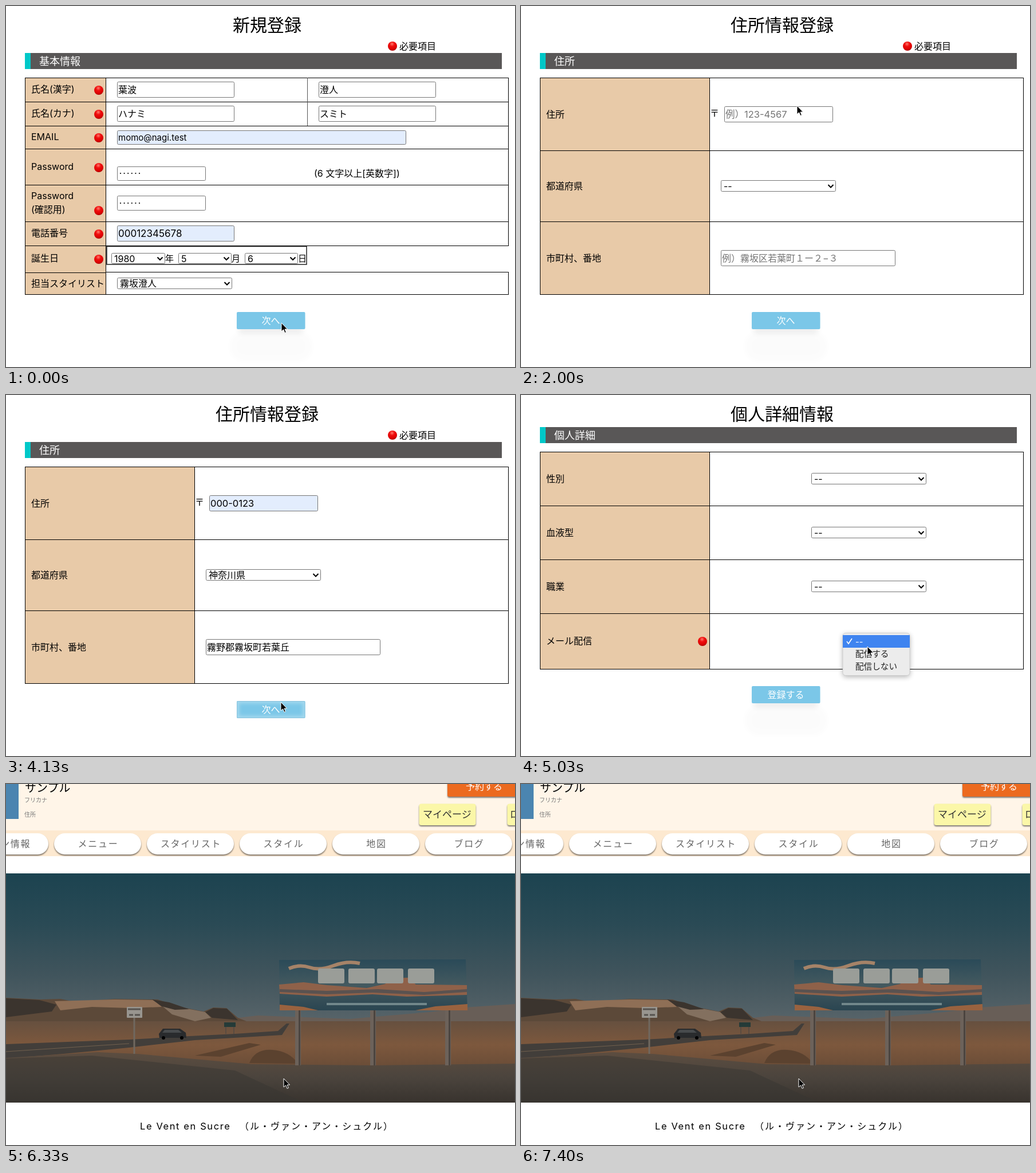
An HTML page that plays this animation: 889x630 px, repeating every 7430 ms.

```html
<!DOCTYPE html>
<html lang="ja">
<head>
<meta charset="utf-8">
<title>新規登録</title>
<style>
html, body { margin: 0; width: 100%; height: 100%; overflow: hidden; background: #fff; }
#stage { display: block; width: 889px; height: 630px; }
text { font-family: Inter, "Noto Sans CJK JP", "Noto Sans CJK", sans-serif; white-space: pre; }
</style>
</head>
<body>
<svg id="stage" viewBox="0 0 889 630" xmlns="http://www.w3.org/2000/svg"></svg>
<script>
const LOOP = 7430;
const TAN = '#e8caa8', AUTOFILL = '#e3edfd';

// --- drawing helpers: each returns SVG markup ---
const rect = (x, y, w, h, fill, extra = '') =>
  `<rect x="${x}" y="${y}" width="${w}" height="${h}" fill="${fill}" ${extra}/>`;
const path = (d, fill, extra = '') => `<path d="${d}" fill="${fill}" ${extra}/>`;
const line = (d, color = '#000', width = 1) => path(d, 'none', `stroke="${color}" stroke-width="${width}"`);
// y is the visual middle of the line of text
const text = (x, y, str, size = 16, fill = '#000', extra = '') =>
  `<text x="${x}" y="${y + size * 0.38}" font-size="${size}" fill="${fill}" ${extra}>${str}</text>`;
const middle = 'text-anchor="middle"';
const group = (id, body) => `<g id="${id}">${body}</g>`;
const ball = (x, y) => `<circle cx="${x}" cy="${y}" r="8" fill="url(#red)"/>`;

const field = (x, y, w, h, str = '', fill = '#fff', size = 16, color = '#000') =>
  rect(x + .5, y + .5, w - 1, h - 1, fill, 'rx="2" stroke="#767676"') +
  text(x + 2, y + h / 2, str, size, color);
const ring = (x, y, w, h) =>
  rect(x + .5, y + .5, w - 1, h - 1, 'none', 'rx="2.5" stroke="#1b57b8" stroke-width="2"');
const select = (x, y, w, h, str) => field(x, y, w, h) + text(x + 5, y + h / 2, str) +
  line(`M${x + w - 13.5} ${y + h / 2 - 2}l4.5 4.5l4.5 -4.5`, '#000', 2);
const dots = (x, y) => [0, 1, 2, 3, 4, 5]
  .map(i => `<circle cx="${x + 4 + i * 6.6}" cy="${y}" r="1.1"/>`).join('');

const heading = (title, bar, y) =>
  text(456, 33, title, 30, '#000', middle) +
  rect(33, y, 833, 28, '#595757') + rect(33, y, 10, 28, '#00c8c8') +
  text(58, y + 14, bar, 18, '#fff');
const required = ball(675, 70) + text(687, 70, '必要項目');

const button = (id, y, label) =>
  group(id + 'Shade',
    rect(391, y + 34, 144, 52, '#000', 'rx="24" opacity=".011" filter="url(#soft)"') +
    rect(406, y + 8, 113, 30, '#000', 'rx="6" opacity=".06" filter="url(#soft)"')) +
  rect(403, y, 119.5, 30, '#7bc7e8', 'rx="2"') +
  group(id + 'Glow',
    `<svg x="403" y="${y}" width="119.5" height="30">` +
    rect(0, 0, 119.5, 30, 'none', 'rx="2" stroke="#a6d9ee" stroke-width="8" filter="url(#inset)"') +
    rect(.5, .5, 118.5, 29, 'none', 'rx="2" stroke="#86c1dc"') + '</svg>') +
  text(462.5, y + 15, label, 16, '#fff', middle);

// label column, horizontal rules and outer frame
const table = (ys, col) => {
  const top = ys[0], bottom = ys[ys.length - 1];
  return rect(33.5, top + .5, col - 33, bottom - top, TAN) +
    line(ys.map(y => `M33 ${y + .5}H878`).join('') +
      `M33.5 ${top}V${bottom + 1}M${col + .5} ${top}V${bottom}M877.5 ${top}V${bottom}`);
};

// --- pages ---
function basicPage() {
  const labels = [['氏名(漢字)', 145], ['氏名(カナ)', 187], ['EMAIL', 228], ['Password', 280],
    ['Password', 331, 1], ['(確認用)', 355], ['電話番号', 396], ['誕生日', 440], ['担当スタイリスト', 484, 1]];
  return heading('新規登録', '基本情報', 82) + required +
    table([125, 167, 209, 249, 312, 376, 418], 174) +
    rect(33.5, 419, 141, 85, TAN) +
    line('M33.5 418V504M174.5 418V504M33 465.5H175M174 464.5H878M33 503.5H878M877.5 464V504') +
    line('M526.5 125V209', '#555') +
    line('M176 419.5H525V451H176Z', '#222', 1.5) +
    labels.map(([s, y, bare]) => text(44, y, s) + (bare ? '' : ball(162, y + 2))).join('') +
    field(194, 132, 205, 28, '葉波') + field(546, 132, 205, 28, '澄人') +
    field(194, 174, 205, 28, 'ハナミ') + field(546, 174, 205, 28, 'スミト') +
    field(194, 217, 505, 25, 'momo@nagi.test', AUTOFILL, 15) +
    field(194, 280, 155, 25) + dots(196, 292) + text(538, 292, '(6 文字以上[英数字])') +
    field(194, 331, 155, 26) + dots(196, 344) +
    field(194, 383, 205, 28, '00012345678', AUTOFILL, 17) +
    select(184, 431, 94, 19, '1980') + text(278, 440, '年', 15) +
    select(301, 431, 93, 19, '5') + text(394, 440, '月', 15) +
    select(417, 431, 93, 19, '6') + text(510, 440, '日', 15) +
    select(194, 474, 201, 20, '霧坂澄人') +
    button('next1', 534, '次へ');
}

function addressPage() {
  return heading('住所情報登録', '住所', 82) + required +
    table([125, 252, 376, 503], 329) +
    text(44, 189, '住所') + text(44, 314, '都道府県') + text(44, 440, '市町村、番地') +
    text(330, 187, '〒') +
    group('zipEmpty', field(355, 175, 190, 28, '例）123-4567', '#fff', 16.5, '#757575')) +
    group('zipFilled', field(355, 175, 190, 28, '000-0123', AUTOFILL, 16.5)) +
    group('zipRing', ring(355, 175, 190, 28)) +
    group('prefEmpty', select(349, 304, 201, 20, '--')) +
    group('prefFilled', select(349, 304, 201, 20, '神奈川県')) +
    group('townEmpty', field(349, 426, 305, 28, '例）霧坂区若葉町１ー２−３', '#fff', 16, '#757575')) +
    group('townFilled', field(349, 426, 305, 28, '霧野郡霧坂町若葉丘')) +
    group('townRing', ring(349.5, 426, 304, 28)) +
    group('caret', line('M496.5 431V449')) +
    button('next2', 534, '次へ');
}

function detailPage() {
  const rows = ['性別', '血液型', '職業', 'メール配信'];
  const choice = y => rect(562, y, 117, 22, '#3f84f0');
  return heading('個人詳細情報', '個人詳細', 56) +
    table([99, 193, 287, 381, 478], 329) +
    rows.map((s, i) => text(44, [146, 240, 334, 429][i], s)).join('') + ball(317, 430) +
    [136, 230, 324].map(y => select(507, y, 201, 20, '--')).join('') +
    group('mailEmpty', select(562, 419, 91, 20, '--')) +
    group('mailFilled', select(562, 419, 91, 20, '配信する')) +
    button('send', 508, '登録する') +
    group('menu',
      rect(562, 418, 117, 74, '#000', 'rx="5" opacity=".3" filter="url(#soft)"') +
      rect(562, 415.5, 117, 74, '#ececec', 'rx="5" stroke="#c4c4c4" stroke-width=".7"') +
      group('pickNone', choice(419) + text(584, 430, '--', 14.6, '#fff') +
        line('M569 430l3 4l6 -9', '#fff', 1.6) + text(584, 451, '配信する', 14.6, '#222')) +
      group('pickYes', choice(441) + text(584, 430, '--', 14.6, '#222') +
        line('M569 430l3 4l6 -9', '#222', 1.6) + text(584, 451, '配信する', 14.6, '#fff')) +
      text(584, 473, '配信しない', 14.6, '#222'));
}

function billboard() {
  const posts = [510, 641, 772].map(x => rect(x - 5, 394, 10, 97, '#6c625a') +
    rect(x + 1, 394, 3, 97, '#4b443f')).join('');
  return posts +
    path('M477 307L803 306L806 395L478 395Z', 'url(#board)') +
    path('M477 350L520 346L560 351L630 356L662 349L676 339L702 338L716 350L805 351V368L700 371L640 367L560 371L478 366Z', '#8f6149') +
    path('M478 358L560 361L650 358L730 363L805 358V363L730 368L640 364L560 367L478 363Z', '#5a5250') +
    path('M478 385L520 389L545 395H478ZM715 395L750 388L806 384V395Z', '#99623f') +
    line('M494 322Q512 314 530 320T572 317T618 313', '#a58368', 6) +
    [545, 598, 648, 702].map(x => rect(x, 322, 46, 26, '#9a9d98', 'rx="3"')).join('') +
    line('M560 384H735', '#71878b', 4);
}

function photo() {
  return rect(0, 156, 889, 264, 'url(#sky)') +
    path('M380 411L440 404L600 410L740 398L800 390L889 384V425H380Z', '#685e57') +
    // mesas: slopes, sunlit cliff, shaded rock
    path('M0 373L60 376L95 375L120 380L190 375L265 376L300 388L345 397L362 390L385 391L405 408L420 414V425H0Z', '#5c4939') +
    path('M85 379L190 376L258 377L272 389L215 391L150 389L95 395Z', '#8f6f56') +
    path('M262 378L300 389L348 398L358 408L330 414L290 402Z', '#83705f') +
    path('M0 374L58 377L88 385L80 397L40 402L0 407ZM255 376L285 381L320 393L295 394L272 388ZM348 398L362 391L386 392L405 412L360 408Z', '#3b342e') +
    rect(0, 414, 889, 82, 'url(#desert)') +
    // road, verge and track
    path('M0 454L215 446L320 440L400 436L475 431L490 418H495L482 438L330 447L215 460L100 471L0 479Z', '#423e3a') +
    line('M0 467L215 453', '#71604e', 1) +
    path('M330 474L425 452L445 455L375 476ZM425 487Q435 462 465 464T510 488Z', '#5b422f') +
    path('M0 478L160 468L230 471L330 480L430 489L640 491L889 488V556H0Z', 'url(#gravel)') +
    path('M0 479L150 474L400 500L520 556H0Z', '#393632', 'opacity=".5"') +
    billboard() +
    rect(222.5, 408, 3, 63, '#70685f') + rect(211, 389, 27, 19, '#98958f', 'rx="1"') +
    line('M213 393H235M215 403H222M225 403H234', '#56534f', 3) +
    rect(381, 416, 20, 8, '#253b38') + line('M384 424V436M398 424V436', '#444') +
    path('M267 436L274 427H304L314 434L315 443H268Z', '#292b2d') +
    path('M277 429H301L307 434H273Z', '#474b4d') +
    '<circle cx="275" cy="443" r="3"/><circle cx="307" cy="443" r="3"/>';
}

function sitePage() {
  const pills = ['サロン情報', 'メニュー', 'スタイリスト', 'スタイル', '地図', 'ブログ'];
  const tab = (x, y, w, h, r, fill) =>
    rect(x, y + 2, w, h, '#000', `rx="${r}" opacity=".5" filter="url(#edge)"`) +
    rect(x, y, w, h, fill, `rx="${r}"`);
  return rect(0, 0, 889, 630, '#fff') + rect(0, 0, 889, 82, '#fff5e8') + rect(0, 81, 889, 45, '#fde9d0') +
    rect(0, 0, 22, 61, '#4b85b0') +
    text(33, 6, 'サンプル', 20) + text(32, 28, 'フリカナ', 10, '#777') + text(32, 53, '住所', 10, '#777') +
    tab(771, -12, 130, 34, 3, '#ec6a1f') + text(803, 4, '予約する', 16, '#fff') +
    tab(721.5, 34.5, 99, 37.5, 4, '#fbf7a8') + text(728, 53, 'マイページ', 17, '#333') +
    tab(875.5, 34.5, 99, 37.5, 4, '#fbf7a8') + text(880, 53, 'ログアウト', 17, '#333') +
    pills.map((s, i) => {
      const x = -78 + i * 162;
      return tab(x, 86, 152, 37, 18.5, '#fff') +
        text(x + 77, 104, s, 16, '#666', middle + ' letter-spacing="1.7"');
    }).join('') +
    photo() +
    text(234, 597, 'Le Vent en Sucre', 16.5, '#000', 'letter-spacing="1.6"') +
    text(408, 597, '（ル・ヴァン・アン・シュクル）', 16, '#000', 'letter-spacing="2"');
}

const gradient = (id, stops) => `<linearGradient id="${id}" x1="0" y1="0" x2="0" y2="1">` +
  stops.map((c, i) => `<stop offset="${i / (stops.length - 1)}" stop-color="${c}"/>`).join('') + '</linearGradient>';
const blur = (id, amount) =>
  `<filter id="${id}" x="-30%" y="-80%" width="160%" height="260%"><feGaussianBlur stdDeviation="${amount}"/></filter>`;

const stage = document.getElementById('stage');
stage.innerHTML = '<defs>' +
  '<radialGradient id="red" cx=".45" cy=".27" r=".75"><stop offset="0" stop-color="#ff7a6c"/>' +
  '<stop offset=".35" stop-color="#f01010"/><stop offset=".75" stop-color="#dc0000"/>' +
  '<stop offset="1" stop-color="#a80000"/></radialGradient>' +
  gradient('sky', ['#1c4350', '#2a4a55', '#40545c', '#59656a']) +
  gradient('board', ['#2a4a58', '#44595f', '#2a4551']) +
  gradient('desert', ['#66503f', '#7d583d', '#694c37']) +
  gradient('gravel', ['#5c4d40', '#4b443d', '#38332e']) +
  blur('soft', 5) + blur('inset', 3.2) + blur('edge', 1) + '</defs>' +
  group('basic', basicPage()) + group('address', addressPage()) +
  group('detail', detailPage()) + group('site', sitePage()) +
  group('cursor', path('M0 0V15L3.6 11.8L6 17.4L8.4 16.4L6 11H10.6Z', '#000', 'stroke="#fff"'));

// --- timeline ---
const spans = {
  basic: [0, 1070], address: [1070, 4370], detail: [4370, 6280], site: [6280, LOOP],
  zipEmpty: [0, 2450], zipFilled: [2450, LOOP], zipRing: [2150, 2600],
  prefEmpty: [0, 2600], prefFilled: [2600, LOOP],
  townEmpty: [0, 2600], townFilled: [2600, LOOP], townRing: [2600, 3700],
  mailEmpty: [0, 5450], mailFilled: [5450, LOOP], menu: [4980, 5450],
  pickNone: [0, 5130], pickYes: [5130, LOOP]
};
const presses = { next1: 370, next2: 3700, send: 5860 };
const moves = [
  [0, 481, 553], [1330, 481, 553], [1960, 482, 174], [2040, 482, 174], [2160, 482, 188],
  [2300, 482, 188], [2440, 482, 225], [2800, 482, 225], [3070, 467, 338], [3560, 480, 536],
  [4560, 480, 536], [4930, 605, 439], [5060, 605, 439], [5200, 609, 453], [5470, 609, 453],
  [5800, 485, 514], [LOOP, 485, 514]
];

const el = id => document.getElementById(id);
const ease = p => p * p * (3 - 2 * p);
const inside = (t, [from, to]) => t >= from && t < to;
const show = (id, on) => el(id).style.display = on ? '' : 'none';

function cursorAt(t) {
  const i = moves.findIndex(m => m[0] > t);
  const [t0, x0, y0] = moves[i - 1], [t1, x1, y1] = moves[i];
  const p = ease((t - t0) / (t1 - t0));
  return [x0 + (x1 - x0) * p, y0 + (y1 - y0) * p];
}

function draw(t) {
  for (const id in spans) show(id, inside(t, spans[id]));
  show('caret', inside(t, spans.townRing) && (t - spans.townRing[0]) % 1000 < 500);
  for (const id in presses) {
    const glow = Math.min(1, Math.max(0, (t - presses[id]) / 300));
    el(id + 'Glow').style.opacity = glow;
    el(id + 'Shade').style.opacity = 1 - glow;
  }
  el('cursor').setAttribute('transform', `translate(${cursorAt(t)})`);
}

const start = performance.now();
function tick() {
  draw((performance.now() - start) % LOOP);
  requestAnimationFrame(tick);
}
tick();
</script>
</body>
</html>
```
